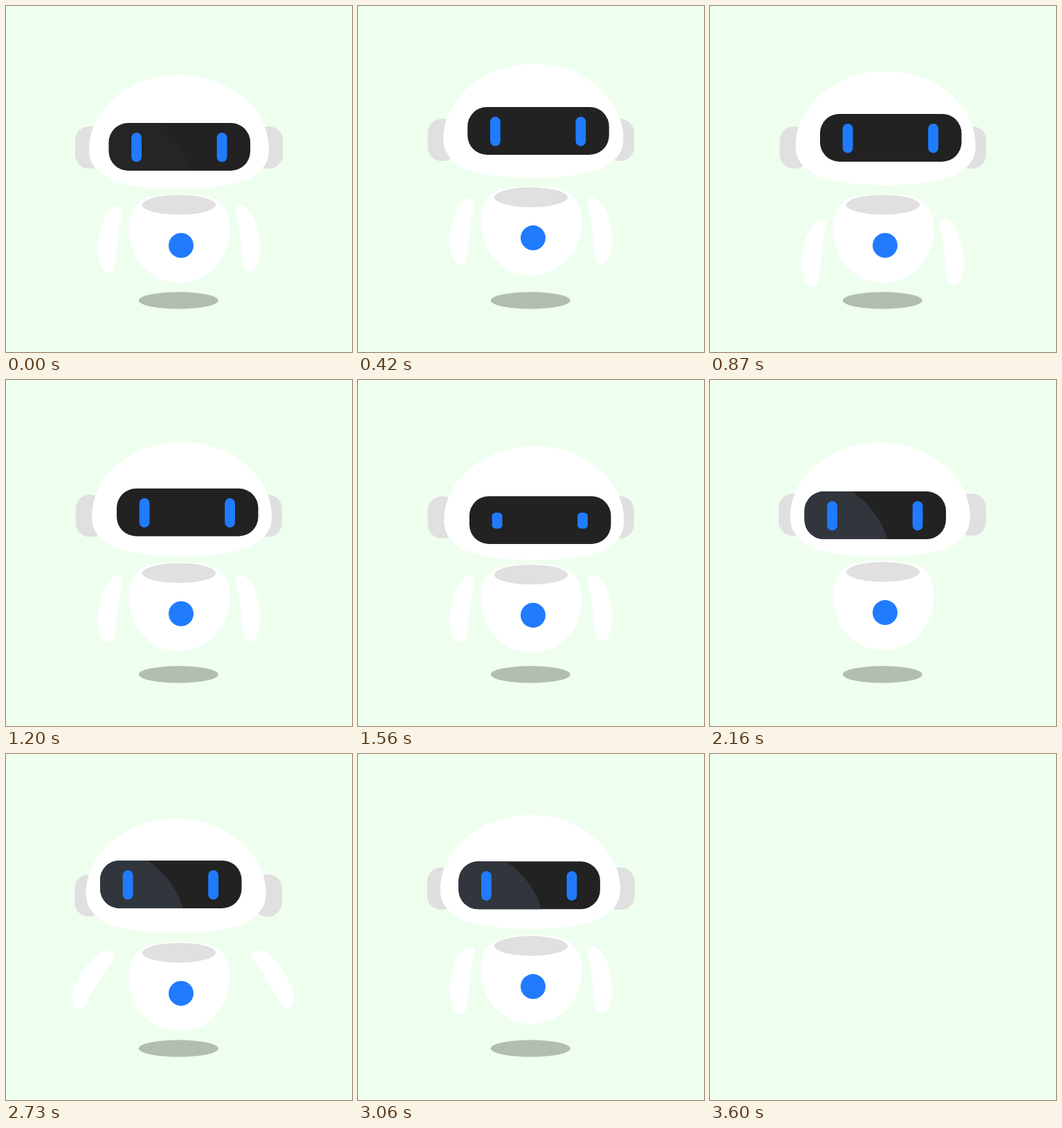
An HTML page for the animation above (3.63 s loop, 500 by 500 pixels).

```html
<!DOCTYPE html>
<html lang="en">
<head>
<meta charset="utf-8">
<title>Floating robot</title>
<style>
  html, body { margin: 0; width: 100%; height: 100%; overflow: hidden; background: #efffef; }
  svg { display: block; width: 100vw; height: 100vh; }
</style>
</head>
<body>
<svg viewBox="0 0 500 500">
  <defs>
    <clipPath id="screen"><rect x="148.5" y="169" width="204.5" height="69" rx="28"/></clipPath>
    <path id="arm" d="M162 289C144 290 133 325 133 351C133 372 139 385 148 385C155 385 157 380 158 370C160 345 163 320 168 298C169 292 167 289 162 289Z"/>
  </defs>
  <g id="robot">
    <ellipse cx="249.3" cy="425.5" rx="57.5" ry="12.3" fill="#b2beb2"/>
    <g id="float">
      <g id="arms" fill="#fff">
        <use id="armL" href="#arm"/>
        <g transform="matrix(-1 0 0 1 500 -1.5)"><use id="armR" href="#arm"/></g>
      </g>
      <path fill="#fff" d="M250.5 271.5C300 271.5 323 282 323 322C323 368 291 400 250.5 400C210 400 178 368 178 322C178 282 201 271.5 250.5 271.5Z"/>
      <ellipse cx="250" cy="287.3" rx="53" ry="14.3" fill="#e0e0e0"/>
      <circle cx="253" cy="346" r="18" fill="#207bff"/>
      <g fill="#e0e0e0">
        <rect id="earL" x="100" y="174" width="42" height="61" rx="20"/>
        <rect id="earR" x="358" y="174" width="42" height="61" rx="20"/>
      </g>
      <path id="head" fill="#fff" d="M250 99.5C321.8 99.5 380 149 380 207C380 246 340 264 250 264C160 264 120 246 120 207C120 149 178.2 99.5 250 99.5Z"/>
      <g id="visor">
        <g clip-path="url(#screen)">
          <rect x="148" y="168" width="206" height="71" fill="#222"/>
          <path id="shine" fill="#31363d" d="M148 168H215.5Q254 193 269 239H148Z"/>
        </g>
        <g id="eyes" fill="#207bff">
          <rect x="181.2" y="183" width="14.8" height="42.5" rx="7.4"/>
          <rect x="304.7" y="183" width="14.8" height="42.5" rx="7.4"/>
        </g>
      </g>
    </g>
  </g>
</svg>
<script>
  const STEP = 30, LOOP = 3630, LAST = 120;
  const $ = id => document.getElementById(id);
  const set = (id, value) => $(id).setAttribute('transform', value);
  const move = (id, x, y) => set(id, `translate(${x} ${y})`);

  const ease = p => (1 - Math.cos(Math.PI * Math.min(1, Math.max(0, p)))) / 2;

  // Each row: start, end, then the values reached at the end.
  const GAZE = [
    [9, 15, 10.5, -13],
    [37, 43, 12.5, 5],
    [56, 62, -12, 2],
    [75, 81, -12.5, -15],
    [98, 104, 0, 0]
  ];
  const DROP = [[15, 29, 20.5], [30, 43, 0]];
  const SPREAD = [[75, 81, 1], [94, 100, 0]];
  const BLINK = [[50, 54, 0.1], [54, 58, 1]];
  const SHINE = [[0, 3, 0], [56, 62, 1], [106, 121, 0.15]];

  function track(rows, first, f) {
    let v = first;
    for (const [a, b, ...to] of rows) {
      if (f <= a) break;
      const p = ease((f - a) / (b - a));
      v = v.map((from, i) => from + (to[i] - from) * p);
    }
    return v;
  }

  function draw(f) {
    $('robot').style.display = f >= LAST ? 'none' : '';
    if (f >= LAST) return;

    const [x, y] = track(GAZE, [0, 0], f);
    move('float', 0, -11 * (1 - Math.cos(2 * Math.PI * f / 30)) / 2);
    move('visor', x, y);
    move('head', x * 0.35, y * 0.4);
    move('earL', x * 0.07, 0);
    move('earR', -Math.abs(x) * 0.1, 0);

    const [open] = track(BLINK, [1], f);
    set('eyes', `translate(0 204.2) scale(1 ${open}) translate(0 -204.2)`);
    $('shine').setAttribute('opacity', track(SHINE, [0.15], f)[0]);

    const [drop] = track(DROP, [0], f);
    const [s] = track(SPREAD, [0], f);
    $('arms').style.display = f > 61 && f < 76 ? 'none' : '';
    move('arms', 0, drop);
    set('armL', `translate(${-10.5 * s} ${-3.5 * s}) rotate(${23.5 * s} 163 293)`);
    set('armR', `translate(${-21.5 * s} ${-3 * s}) rotate(${23.5 * s} 163 293)`);
  }

  const start = performance.now();
  function tick() {
    draw(Math.floor((performance.now() - start) % LOOP / STEP));
    requestAnimationFrame(tick);
  }
  tick();
</script>
</body>
</html>
```
